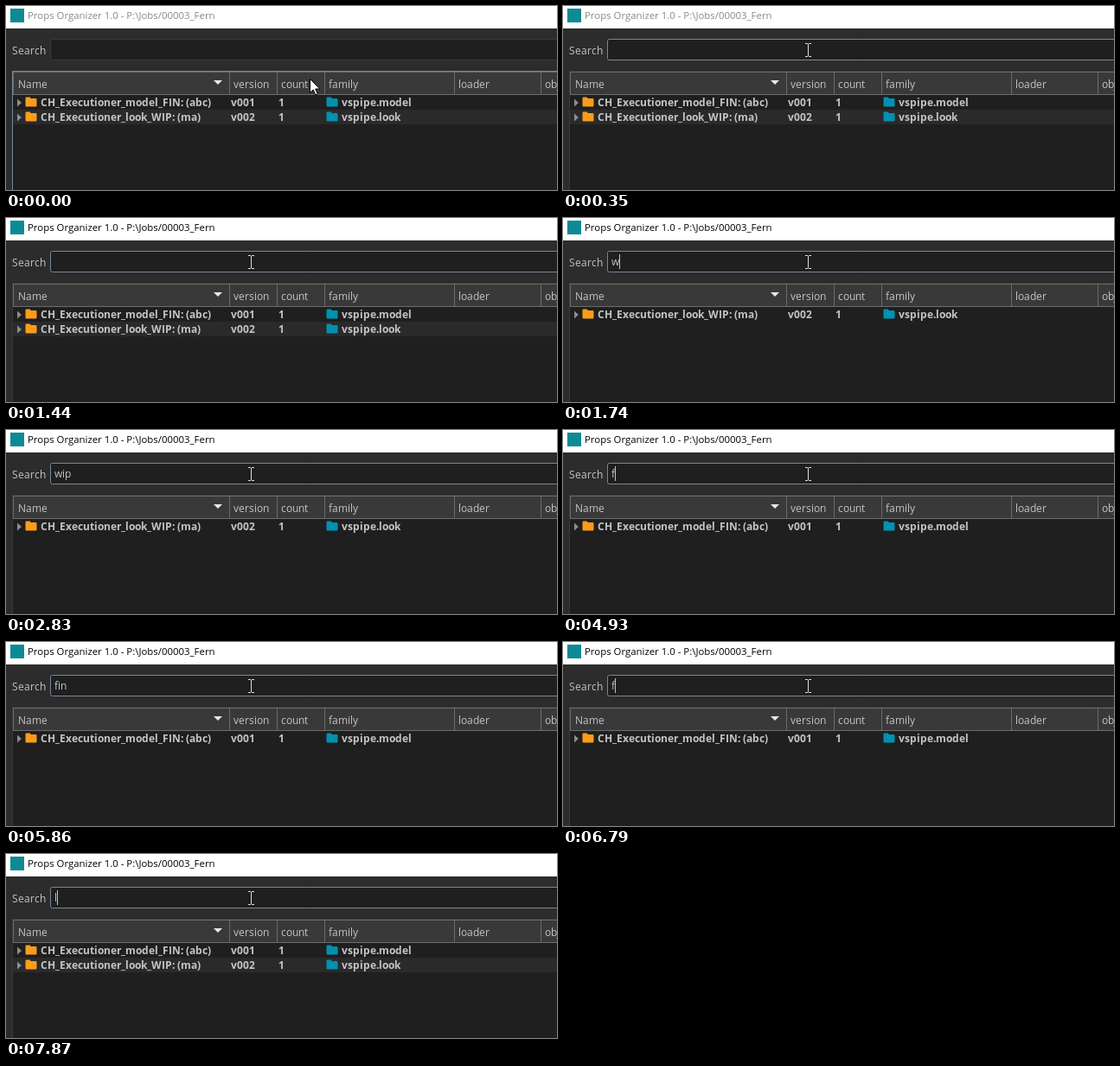
An HTML page with a canvas for the animation above (8 s loop, 637x213 px).

```html
<!DOCTYPE html>
<html lang="en">
<head>
<meta charset="utf-8">
<title>Inventory search</title>
<style>
  html, body { margin: 0; width: 100%; height: 100%; overflow: hidden; background: #2c2c2c; }
  canvas { display: block; }
</style>
</head>
<body>
<canvas id="stage" width="637" height="213"></canvas>
<script>
const ctx = document.getElementById('stage').getContext('2d');
const LOOP = 8000;
const FONT = '"Open Sans", "Noto Sans", sans-serif';
const TEXT = '#c4c4c4', BORDER = '#3a3939', LIT = '#78879b', GRID = '#6c6c6c';

const rows = [
  { name: 'CH_Executioner_model_FIN: (abc)', version: 'v001', family: 'vspipe.model' },
  { name: 'CH_Executioner_look_WIP: (ma)', version: 'v002', family: 'vspipe.look' },
];
const columns = [[14, 'Name'], [263, 'version'], [318, 'count'], [373, 'family'], [523, 'loader'], [623, 'objectName']];
const dividers = [8, 258, 313, 368, 518, 618];

// Search text from each time on
const typing = [
  [0, ''], [1740, 'w'], [1970, 'wi'], [2200, 'wip'], [3210, 'wi'], [3440, 'w'], [3670, ''],
  [4930, 'f'], [5080, 'fi'], [5230, 'fin'], [6560, 'fi'], [6790, 'f'], [6940, ''], [7870, 'l'],
];
const caretOff = [[0, 900], [1440, 1740], [2830, 3210], [4220, 4770], [5860, 6390], [7570, 7870]];

function rect(x, y, w, h, color) {
  ctx.fillStyle = color;
  ctx.fillRect(x, y, w, h);
}

// Whole-pixel letter advances, as in hinted interface text; returns the end position
function label(str, x, y, style = '12px') {
  ctx.font = `${style} ${FONT}`;
  ctx.fillStyle = TEXT;
  for (const letter of str) {
    ctx.fillText(letter, x, y);
    x += Math.round(ctx.measureText(letter).width);
  }
  return x;
}

function shape(points, color, outline) {
  ctx.beginPath();
  points.forEach(([x, y]) => ctx.lineTo(x, y));
  ctx.closePath();
  ctx.fillStyle = color;
  ctx.fill();
  if (outline) {
    ctx.strokeStyle = outline;
    ctx.lineWidth = 1;
    ctx.stroke();
  }
}

function box(x, y, w, h, radius, fill, border) {
  ctx.beginPath();
  ctx.roundRect(x + 0.5, y + 0.5, w, h, radius);
  ctx.fillStyle = fill;
  ctx.fill();
  ctx.strokeStyle = border;
  ctx.lineWidth = 1;
  ctx.stroke();
}

function folder(x, y, color) {
  ctx.beginPath();
  ctx.roundRect(x, y, 6, 4, 1.3);
  ctx.roundRect(x, y + 1.6, 13, 9.4, 1.3);
  ctx.fillStyle = color;
  ctx.fill();
}

function arrow(x, y) {
  const outline = [[0, 0], [0, 16], [3.7, 12.5], [6.3, 18.3], [8.8, 17.2], [6.2, 11.5], [11.3, 11.5]];
  shape(outline.map(([dx, dy]) => [x + dx, y + dy]), '#fff', '#000');
}

function beam(x, y) {
  const color = '#dedede';
  for (const edge of [y - 8, y + 7]) {
    rect(x - 3, edge, 3, 1, color);
    rect(x + 1, edge, 3, 1, color);
  }
  rect(x, y - 7, 1, 14, color);
}

function drawWindow(time) {
  rect(0, 0, 637, 213, '#2c2c2c');
  rect(0, 0, 637, 26, '#fff');
  rect(5, 3, 16, 16, '#0d8a94');
  ctx.font = `11.4px ${FONT}`;
  ctx.fillStyle = time < 900 ? '#888' : '#000';
  ctx.fillText('Props Organizer 1.0 - P:\\Jobs/00003_Fern', 25, 15);
}

function drawSearch(time, query) {
  label('Search', 7, 56);
  box(51, 38, 600, 24, 2, '#1f1f1f', time < 200 ? BORDER : LIT);
  const caret = label(query, 56, 55);
  if (!caretOff.some(([from, to]) => time >= from && time < to)) rect(caret, 42, 1, 17, TEXT);
}

function drawTable(time, query) {
  box(7, 75, 650, 160, 0, '#1f1f1f', time < 70 ? LIT : BORDER);
  rect(8, 76, 629, 27, BORDER);
  rect(8, 76, 629, 1, GRID);
  rect(8, 102, 629, 1, GRID);
  dividers.forEach(x => rect(x, 76, 1, 26, GRID));
  columns.forEach(([x, title]) => label(title, x, 95));
  shape([[240, 86], [250, 86], [245, 91]], '#e8e8e8');

  rows.filter(row => row.name.toLowerCase().includes(query)).forEach((row, i) => {
    const y = 103 + i * 17;
    if (i % 2) rect(8, y, 629, 17, '#2a2a2a');
    shape([[13, y + 4.5], [18, y + 9], [13, y + 13.5]], '#8c8c8c');
    folder(22.5, y + 2.5, '#fb9c1a');
    folder(370.5, y + 2.5, '#0091b2');
    [[40, row.name], [260, row.version], [315, '1'], [388, row.family]]
      .forEach(([x, value]) => label(value, x, y + 13, 'bold 12px'));
  });
}

function drawPointer(time) {
  if (time < 70) arrow(351.5, 84.5);
  else if (time < 200) arrow(317.5, 66.5);
  else beam(283, time < 350 ? 53 : 51);
}

function render(now) {
  const time = now % LOOP;
  const query = typing.findLast(([start]) => start <= time)[1];
  drawWindow(time);
  drawSearch(time, query);
  drawTable(time, query);
  drawPointer(time);
}

function tick() {
  render(performance.now());
  requestAnimationFrame(tick);
}
tick();
</script>
</body>
</html>
```
